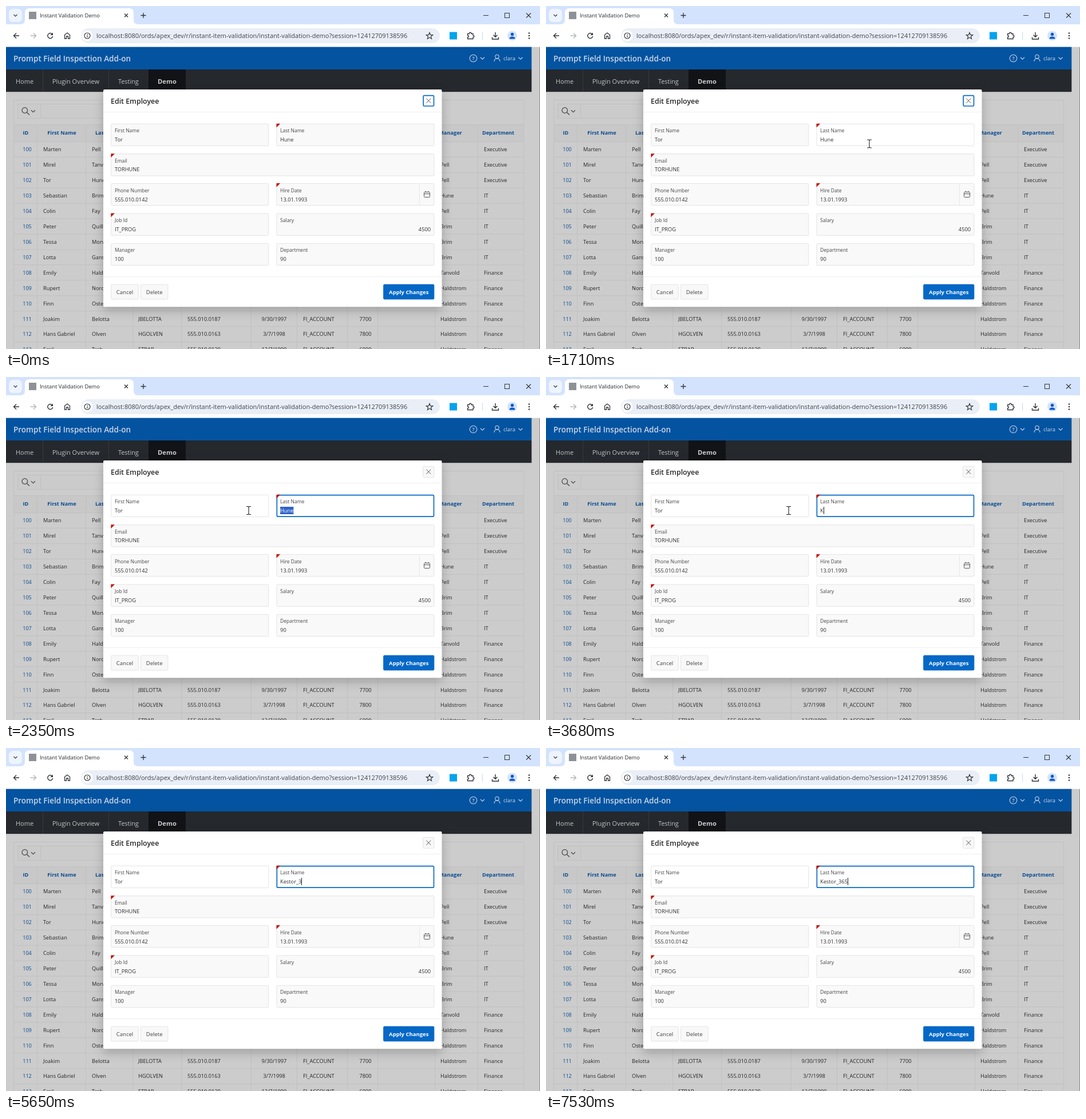
Write an HTML page that moves like this. It is 933 px wide and 600 px high and loops after 8 s.

```html
<!DOCTYPE html>
<html lang="en">
<head>
<meta charset="utf-8">
<title>Edit Employee</title>
<style>
  html, body { margin: 0; width: 100%; height: 100%; overflow: hidden; background: #ccc; }
  svg { display: block; font-family: "Open Sans", "Noto Sans", sans-serif; }
  text { white-space: pre; }
  .modal { filter: drop-shadow(0 6px 9px rgba(0, 0, 0, .22)); }
</style>
</head>
<body>
<svg id="stage" width="933" height="600" viewBox="0 0 933 600"></svg>
<script>
const LOOP = 8000;
const stage = document.getElementById("stage");

function add(tag, attrs, parent = stage) {
  const el = document.createElementNS("http://www.w3.org/2000/svg", tag);
  for (const key in attrs) el.setAttribute(key, attrs[key]);
  parent.appendChild(el);
  return el;
}
const rect = (x, y, width, height, fill, more = {}) =>
  add("rect", { x, y, width, height, fill, ...more });
const circle = (cx, cy, r, fill, more = {}) => add("circle", { cx, cy, r, fill, ...more });
const line = (d, stroke, width = 1, more = {}) =>
  add("path", { d, stroke, "stroke-width": width, fill: "none", ...more });
const shape = (d, fill, more = {}) => add("path", { d, fill, ...more });

// y is the middle of the capital letters
function text(str, x, y, size, fill, weight = 400, anchor = "start") {
  const el = add("text", {
    x, y: y + size * 0.36, "font-size": size, fill, "font-weight": weight, "text-anchor": anchor
  });
  el.textContent = str;
  return el;
}
const chevron = (x, y, color, s = 3.5) =>
  line(`M${x - s} ${y - s / 2}l${s} ${s}l${s} ${-s}`, color, 1.1);
const cross = (x, y, s, color, w = 1.1) =>
  line(`M${x - s} ${y - s}l${2 * s} ${2 * s}M${x + s} ${y - s}l${-2 * s} ${2 * s}`, color, w);

// The dialog is laid out in page pixels, shown at 5/6 of their size
const ZOOM = 5 / 6;

// Box with its border inside the given outline
function panel(x, y, w, h, fill, stroke) {
  const el = rect(x, y, w, h, fill, { rx: 2, transform: `scale(${ZOOM})` });
  el.outline = [x, y, w, h];
  setBorder(el, stroke, 1);
  return el;
}
function setBorder(el, stroke, thick) {
  const [x, y, w, h] = el.outline;
  const attrs = {
    x: x + thick / 2, y: y + thick / 2, width: w - thick, height: h - thick,
    stroke, "stroke-width": thick
  };
  for (const key in attrs) el.setAttribute(key, attrs[key]);
}

function drawBrowser() {
  const ink = "#30343a";
  rect(0, 0, 933, 34, "#d3e3fd");
  rect(5, 5, 23, 23, "#eef4fe", { rx: 7 });
  chevron(16.5, 16.5, ink, 3);
  shape("M25 32q8 0 8-8V12q0-8 8-8H215q8 0 8 8V24q0 8 8 8z", "#fff");
  rect(0, 32, 933, 40, "#fff");
  rect(40, 10, 13, 13, "#8e9296");
  text("Instant Validation Demo", 59, 16.5, 9.35, "#25282c");
  cross(210, 16.5, 3, ink, 1.3);
  line("M235.500 16.500h9M240 12v9", ink, 1.3);
  line("M834 16.500h9", ink);
  rect(871.5, 12.5, 8, 8, "none", { stroke: ink });
  cross(913, 16.5, 4, ink);

  line("M23 52H14M18 47.500L13.500 52L18 56.500", ink, 1.4);
  line("M42.500 52H52M48 47.500L52.500 52L48 56.500", "#b4b7bb", 1.4);
  line("M81 49.500A4.500 4.500 0 1 0 81.700 53", ink, 1.4);
  shape("M82 46.500v4.500h-4.500z", ink);
  line("M102.500 50.500L107 47L111.500 50.500V57H108.500V53H105.500V57H102.500Z", ink, 1.3);
  rect(131, 39, 627, 26, "#e9eef7", { rx: 13 });
  circle(142, 52, 9.5, "#fff");
  circle(142, 52, 5, "none", { stroke: ink, "stroke-width": 1.2 });
  line("M142 51.500v3.300M142 49.100v1.300", ink, 1.2);
  text("localhost:8080/ords/apex_dev/r/instant-item-validation/instant-validation-demo?session=12412709138596",
    158, 52.5, 10.98, "#3f4348");
  const star = Array.from({ length: 10 }, (_, i) => {
    const a = i * Math.PI / 5, r = i % 2 ? 2.6 : 6;
    return `${740 + r * Math.sin(a)} ${52.5 - r * Math.cos(a)}`;
  });
  line(`M${star.join("L")}Z`, ink, 1.2);
  rect(775, 45.5, 13, 13, "#00a4ef");
  line("M806.500 48.500H809.500C809 45.500 813.500 45.500 813 48.500H816V51.500C818.500 51 818.500 55 816 54.500V57.500H806.500V54.500C809 55 809 51 806.500 51.500Z", ink, 1.3);
  line("M832.500 45v14", "#c9dcfa", 1.2);
  line("M855 46v8M851.500 50.800L855 54.300L858.500 50.800M849.500 54.500v3.500h11v-3.500", ink, 1.4);
  circle(884.5, 52, 8.5, "#d3e3fd");
  circle(884.5, 49.5, 2.7, "#0b57d0");
  shape("M879.500 57.500q0-4 5-4t5 4z", "#0b57d0");
  for (const dy of [-4.5, 0, 4.5]) circle(914, 52 + dy, 1.3, ink);
}

function drawHeader() {
  const pale = "#c3d3e6", top = 86 * ZOOM, right = 1102 * ZOOM;
  rect(0, top, 933, 600 - top, "#ccc");
  rect(0, top, right, 111 - top, "#0453a0");
  text("Prompt Field Inspection Add-on", 13, 92, 13.5, "#c9d6e6", 600);
  circle(816.5, 91.5, 6.3, "none", { stroke: pale, "stroke-width": 1.1 });
  text("?", 816.5, 91.7, 9, pale, 600, "middle");
  chevron(832.5, 91.5, pale);
  circle(858, 88.5, 3.2, "none", { stroke: pale, "stroke-width": 1.1 });
  line("M853 97q0-5 5-5t5 5", pale, 1.1);
  text("clara", 869, 91.5, 9.4, "#d0dceb");
  chevron(899, 91.5, pale);

  rect(0, 111, right, 39.2, "#25282c");
  rect(249, 111, 65, 39.2, "#111316");
  line("M64.500 111v39M179.500 111v39", "#363a3e");
  text("Home", 17, 132, 11, "#c4c6c8");
  text("Plugin Overview", 81, 132, 11, "#c4c6c8");
  text("Testing", 196, 132, 10.9, "#c4c6c8");
  text("Demo", 265, 132, 11.2, "#ccc", 700);
}

function drawTable() {
  const edge = "#bfbfbf", ink = "#262626", link = "#0b4c92";
  const rule = d => line(d, edge, ZOOM);
  rule("M13.500 600V164.500H904.500V600");
  rect(20.5, 171.5, 720, 25, "#cbcbcb", { stroke: edge, "stroke-width": ZOOM });
  rule("M60.500 172v24");
  circle(32.8, 182.5, 4.8, "none", { stroke: "#444", "stroke-width": 1.2 });
  line("M36.500 186.200L41 190.500", "#444", 1.2);
  chevron(47.5, 184, "#444");

  rect(14, 207, 890, 30, "#c8c8c8");
  rule("M14 207.500H904");
  for (const x of [54, 139, 221, 306, 428, 508, 596, 649, 749, 824]) rule(`M${x + .5} 207V600`);
  const heads = [["ID", 34.5], ["First Name", 97.5], ["Last Name", 180.5], ["Manager", 776.5], ["Department", 860]];
  for (const [label, x] of heads) text(label, x, 221.5, 9.2, link, 700, "middle");

  // first name, last name, manager, department
  const people = [
    ["Marten", "Pell", "", "Executive"],
    ["Mirel", "Tanvold", "Pell", "Executive"],
    ["Tor", "Hune", "Pell", "Executive"],
    ["Sebastian", "Brim", "Hune", "IT"],
    ["Colin", "Fay", "Pell", "IT"],
    ["Peter", "Quillan", "Brim", "IT"],
    ["Tessa", "Morvik", "Brim", "IT"],
    ["Lotta", "Gansow", "Brim", "IT"],
    ["Emily", "Haldstrom", "Tanvold", "Finance"],
    ["Rupert", "Nordel", "Haldstrom", "Finance"],
    ["Finn", "Oster", "Haldstrom", "Finance"],
    ["Joakim", "Belotta", "Haldstrom", "Finance", "JBELOTTA", "555.010.0187", "9/30/1997", "7700"],
    ["Hans Gabriel", "Olven", "Haldstrom", "Finance", "HGOLVEN", "555.010.0163", "3/7/1998", "7800"],
    ["Emil", "Trab", "Haldstrom", "Finance", "ETRAB", "555.010.0129", "12/7/1999", "6900"]
  ];
  people.forEach(([first, last, manager, dept, mail, phone, hired, pay], i) => {
    const y = 251 + 26.93 * i;
    const cell = (str, x, anchor) => text(str, x, y, 9.25, ink, 400, anchor);
    rule(`M14 ${y - 13.5}H904`);
    text(100 + i, 37, y, 9.15, link, 400, "middle");
    cell(first, 65);
    cell(last, 150);
    cell(manager, 759);
    cell(dept, 835);
    if (!mail) return;
    cell(mail, 231);
    cell(phone, 317);
    cell(hired, 468.5, "middle");
    cell("FI_ACCOUNT", 519);
    cell(pay, 628, "middle");
  });
  line("M932.500 72V600", "#8a8a8a");
}

const blue = "#0568c6", grey = "#dfdfdf";
const LEFT = 220, RIGHT = 567, HALF = 331, FULL = 678, BOX_H = 47;

// left edge, row, width, label, value, required
const fields = [
  [LEFT, 0, HALF, "First Name", "Tor"],
  [RIGHT, 0, HALF, "Last Name", "", true],
  [LEFT, 1, FULL, "Email", "TORHUNE", true],
  [LEFT, 2, HALF, "Phone Number", "555.010.0142"],
  [RIGHT, 2, HALF, "Hire Date", "13.01.1993", true],
  [LEFT, 3, HALF, "Job Id", "IT_PROG", true],
  [RIGHT, 3, HALF, "Salary", "4500"],
  [LEFT, 4, HALF, "Manager", "100"],
  [RIGHT, 4, HALF, "Department", "90"]
];
const rowTop = row => 247 + Math.round(62.7 * row);

function drawField([left, row, w, label, value, required]) {
  const top = rowTop(row), x = left * ZOOM, y = 206 + 52.25 * row;
  const box = panel(left, top, w, BOX_H, "#f9f9f9", grey);
  if (required) shape(`M${left} ${top}h8l-8 8z`, "#c1120b", { transform: `scale(${ZOOM})` });
  text(label, x + 6.6, y + 12.3, 8.5, "#454545");
  if (label === "Salary") text(value, 742, y + 28, 9.25, "#303030", 400, "end");
  else text(value, x + 6.6, y + 27.7, 9.25, "#303030");
  return box;
}

function drawButton(x, w, label, fill, stroke, color, weight) {
  panel(x, 584, w, 32, fill, stroke);
  text(label, (x + w / 2) * ZOOM, 500.5, 9.5, color, weight, "middle");
}

drawBrowser();
drawHeader();
drawTable();

rect(170, 146, 591.5, 380.3, "#fff", { rx: 2, class: "modal" });
text("Edit Employee", 183, 166.5, 12.4, "#262626", 600);
line("M170 185.500H761.500M170 473.500H761.500", "#ebebeb", ZOOM);
const closeBox = panel(874, 187, 24, 24, "#f8f8f8", grey);
cross(738.3, 165.7, 4, "#555", 1);
const boxes = fields.map(drawField);
line("M722.500 311V349", "#e4e4e4", ZOOM);
rect(730.5, 325.5, 10, 9, "none", { stroke: "#555", rx: 1 });
line("M730.500 328.500h10M733 323.500v2.500M738 323.500v2.500", "#555");
drawButton(LEFT, 58, "Cancel", "#f8f8f8", grey, "#404040", 400);
drawButton(282, 58, "Delete", "#f8f8f8", grey, "#404040", 400);
drawButton(791, 107, "Apply Changes", blue, blue, "#fff", 700);

const mark = rect(479, 227, 0, 13, "#2f63c9");
const entry = text("", 479, 233.7, 9.25, "#303030");
const caret = rect(0, 227, 1, 13, "#222");

const arrow = add("path", {
  d: "M0 0V12.500L2.900 9.800L5 14.500L7 13.600L4.900 9H9Z", fill: "#fff", stroke: "#111", "stroke-width": .9
});
const beam = add("g", {});
const beamPath = "M-4 -7H-1.200L0 -6L1.200 -7H4M-4 7H-1.200L0 6L1.200 7H4M0 -6V6";
add("path", { d: beamPath, stroke: "#fff", "stroke-width": 2.4, fill: "none" }, beam);
add("path", { d: beamPath, stroke: "#222", "stroke-width": 1.1, fill: "none" }, beam);

const PRESS = 1790, RELEASE = 2190, HIDE = 4340;
const OLD = "Hune", NEW = "Kestor_365";
const keyTimes = [3680, 4090, 4340, 4420, 4590, 4670, 5080, 5570, 7370, 7530];

const ease = p => p * p * (3 - 2 * p);
// Pointer moves in steps of 80 ms
const progress = (t, from, to) =>
  ease(Math.min(1, Math.max(0, Math.floor((t - from) / 80 + .001) * 80 / (to - from))));

function pointer(t) {
  const a = progress(t, 910, 1470), b = progress(t, 1710, RELEASE);
  return [214.5 + 350.5 * a - 141 * b, 541 - 300 * a - 7.5 * b];
}
function hoverAt(px, py) {
  const x = px / ZOOM, y = py / ZOOM;
  return fields.findIndex(([left, row, w]) =>
    x >= left && x <= left + w && y >= rowTop(row) && y <= rowTop(row) + BOX_H);
}
const show = (el, on) => el.setAttribute("visibility", on ? "visible" : "hidden");

function render(t) {
  const [px, py] = pointer(t);
  const focused = t >= PRESS, dragging = focused && t < RELEASE;
  const hover = t < 910 ? -1 : dragging ? 1 : hoverAt(px, py);
  const visible = t >= 910 && t < HIDE;

  boxes.forEach((box, i) => {
    const active = i === 1 && focused;
    box.setAttribute("fill", active || i === hover ? "#fff" : "#f9f9f9");
    setBorder(box, active ? blue : grey, active ? 2 : 1);
  });
  closeBox.setAttribute("fill", focused ? "#f8f8f8" : "#fff");
  setBorder(closeBox, focused ? grey : blue, focused ? 1 : 2);

  const typed = keyTimes.filter(k => k <= t).length;
  entry.textContent = typed ? NEW.slice(0, typed) : OLD;
  const width = entry.getComputedTextLength();
  const selected = focused && !typed && px < 490;
  mark.setAttribute("width", selected ? width : 0);
  entry.setAttribute("fill", selected ? "#fff" : "#303030");
  caret.setAttribute("x", Math.round(479 + width));
  const blinkOff = t >= 6140 && t < 6630 || t >= 7130 && t < 7370;
  show(caret, focused && !selected && !blinkOff);

  show(arrow, visible && hover < 0);
  show(beam, visible && hover >= 0);
  const place = `translate(${px} ${py})`;
  arrow.setAttribute("transform", place);
  beam.setAttribute("transform", place);
}

const start = performance.now();
function tick() {
  render((performance.now() - start) % LOOP);
  requestAnimationFrame(tick);
}
render(0);
requestAnimationFrame(tick);
</script>
</body>
</html>
```
